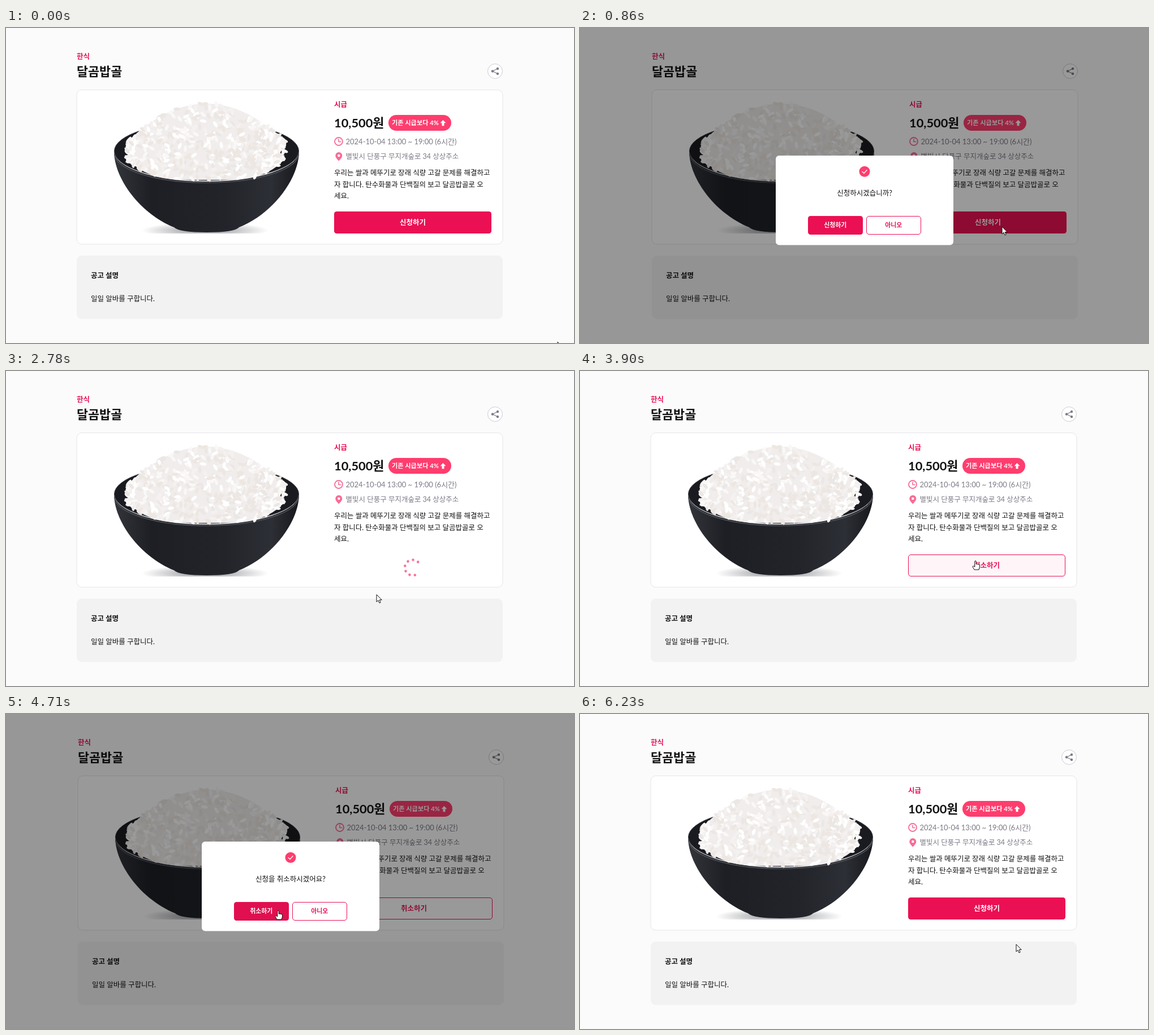
These frames come from a looping animation (1004x558 px, 6310 ms). An HTML page:

```html
<!DOCTYPE html>
<html lang="ko">
<head>
<meta charset="utf-8">
<style>
  html, body { margin: 0; width: 100%; height: 100%; overflow: hidden; background: #fbfbfb; }
  svg { display: block; }
  text { font: 12.5px Lato, "Noto Sans CJK KR", "Noto Sans CJK JP", sans-serif; fill: #111; }
  .bold { font-weight: 700; }
  .big { font-size: 21.8px; }
  .small { font-size: 10.9px; }
  .mid { text-anchor: middle; }
  .gray { fill: #7d7986; }
  .red { fill: #eb1053; }
  .white { fill: #fff; }
  .solid rect { fill: #eb1053; }
  .solid.hover rect { fill: #e00f4f; }
  .outline rect { fill: #fff; stroke: #eb1053; }
  .outline.hover rect { fill: #fff5f8; }
  .line { fill: none; stroke-width: 1.6; stroke-linecap: round; stroke-linejoin: round; }
</style>
</head>
<body>
<svg width="1004" height="558" viewBox="0 0 1004 558">
  <defs>
    <linearGradient id="bowlTone">
      <stop offset="0" stop-color="#33353b"/>
      <stop offset=".2" stop-color="#1d1f24"/>
      <stop offset=".6" stop-color="#22242a"/>
      <stop offset=".85" stop-color="#2d2f36"/>
      <stop offset="1" stop-color="#17181c"/>
    </linearGradient>
    <radialGradient id="shadow" cy=".8">
      <stop offset=".4" stop-color="#b9babd"/>
      <stop offset="1" stop-color="#fff"/>
    </radialGradient>
  </defs>

  <g id="page">
    <text class="bold red" x="125" y="54.6">한식</text>
    <text class="bold big" x="125" y="85">달곰밥골</text>
    <circle cx="864.5" cy="76.5" r="13" fill="#fff" stroke="#cbc9cf"/>
    <path class="line" d="M869 72l-9 4.5 9 4.5" stroke="#7d7986" style="stroke-width:1.3"/>
    <g fill="#7d7986">
      <circle cx="869" cy="72" r="2.2"/><circle cx="860" cy="76.5" r="2.2"/><circle cx="869" cy="81" r="2.2"/>
    </g>

    <rect x="125" y="109.5" width="753" height="273.5" rx="9" fill="#fff" stroke="#e5e6eb"/>
    <rect x="240" y="336" width="224" height="28" fill="url(#shadow)"/>
    <ellipse cx="354.5" cy="218" rx="163" ry="52" fill="#1a1b20" stroke="#3c3e45"/>
    <path d="M191 218A163.5 54 0 0 0 518 218C518 268 470 330 412 353Q404 362 355 362T297 353C239 330 191 268 191 218Z" fill="url(#bowlTone)"/>
    <path d="M192 223A162.5 51 0 0 0 517 223" fill="none" stroke="#50525a" stroke-width="1.5"/>
    <g id="rice"></g>

    <text class="bold red" x="580" y="139.6">시급</text>
    <text class="bold big" x="580" y="176">10,500원</text>
    <rect x="676" y="154" width="111" height="28" rx="14" fill="#ff3d6e"/>
    <text class="bold white" x="682" y="172" style="font-size:11.2px">기존 시급보다 4%</text>
    <path d="M772.5 163l5 5.2h-3v5h-4v-5h-3z" fill="#fff"/>
    <circle cx="588" cy="201" r="7" class="line" stroke="#f86c96" style="stroke-width:1.8"/>
    <path d="M588 197v4.5h4" class="line" stroke="#f86c96"/>
    <text class="gray" x="600.5" y="205.5" style="font-size:13px">2024-10-04 13:00 ~ 19:00 (6시간)</text>
    <path d="M588.3 235.5C584 231 582.3 228.5 582.3 226a6 6 0 0 1 12 0C594.3 228.5 592.6 231 588.3 235.5Z" fill="#f86c96"/>
    <circle cx="588.3" cy="226" r="2.2" fill="#fff"/>
    <text class="gray" x="600.5" y="232">별빛시 단풍구 무지개숲로 34 상상주소</text>
    <text x="580" y="261">우리는 쌀과 메뚜기로 장래 식량 고갈 문제를 해결하고</text>
    <text x="580" y="281.5">자 합니다. 탄수화물과 단백질의 보고 달곰밥골로 오</text>
    <text x="580" y="302">세요.</text>

    <g id="apply" class="solid">
      <rect x="580" y="325" width="278" height="39" rx="4.5"/>
      <text class="bold mid white" x="719" y="349">신청하기</text>
    </g>
    <g id="cancel" class="outline">
      <rect x="580.5" y="325.5" width="277" height="38" rx="4.5"/>
      <text class="bold mid red" x="719" y="349">취소하기</text>
    </g>
    <g id="spinner" fill="#fb7299"></g>

    <rect x="125" y="403" width="753" height="112.5" rx="9" fill="#f2f2f3"/>
    <text class="bold" x="150" y="442.7">공고 설명</text>
    <text x="150" y="483.5">일일 알바를 구합니다.</text>
  </g>

  <g id="modal">
    <rect width="1004" height="558" fill-opacity=".4"/>
    <rect x="346" y="226" width="314" height="158.5" rx="6" fill="#fff"/>
    <circle cx="503" cy="254.3" r="9.5" fill="#ff3d6e"/>
    <path class="line" d="M499 254.5l3 2.8 5-5.5" stroke="#fff" style="stroke-width:1.3"/>
    <text id="question" class="mid" x="503" y="296.5"></text>
    <g id="confirm" class="solid">
      <rect x="403" y="333" width="97" height="33" rx="4.5"/>
      <text id="answer" class="bold small mid white" x="451.3" y="353.3"></text>
    </g>
    <g class="outline">
      <rect x="506.5" y="333.5" width="96" height="32" rx="4.5"/>
      <text class="bold small mid red" x="554.3" y="353.3">아니오</text>
    </g>
  </g>

  <g id="cursor" fill="#fff" stroke="#111" stroke-linejoin="round">
    <path id="arrow" d="M0 0V13L3 10.2 5 15 7.2 14 5.2 9.5H9.2Z"/>
    <path id="hand" d="M-1.2 1Q0-.8 1.2 1V6Q5 5.6 7.5 7.5V11L6 16H-2L-5.2 10.5Q-4.5 8.5-1.2 11Z"/>
  </g>
</svg>

<script>
const LOOP = 6310, STEP = 80, SPIN_PERIOD = 640;
const $ = id => document.getElementById(id);
const show = (id, on) => $(id).style.display = on ? '' : 'none';
const held = ms => Math.floor(ms / STEP) * STEP;

// [start, view, spinner angle at start]
const VIEWS = [
  [0, 'apply'], [860, 'applyModal'], [1490, 'spinner', 13], [2940, 'cancel'],
  [4060, 'cancelModal'], [4790, 'spinner', 31], [5430, 'apply']
];

// Cursor stops: [time, x, y]
const STOPS = [
  [0, 975, 556], [460, 735, 346], [610, 735, 346], [860, 746, 352], [940, 746, 352],
  [1240, 470, 354], [1330, 470, 354], [1490, 661, 355], [1730, 661, 355], [2370, 655, 396],
  [3020, 655, 396], [3660, 696, 334], [3820, 696, 334], [3900, 699, 336], [3980, 699, 336],
  [4060, 700, 343], [4140, 700, 343], [4710, 481, 348], [4790, 481, 348], [5430, 616, 395],
  [5900, 616, 395], [6230, 771, 408], [LOOP, 771, 408]
];

function buildRice() {
  let seed = 7;
  const random = () => (seed = seed * 16807 % 2147483647) / 2147483647;
  const top = u => 134 + 66 * u * u;
  const bottom = u => 269 - 36 * u ** 4;
  const points = [];
  for (let u = -1; u <= 1; u += .05) {
    points.unshift([354 + u * 138, top(u)]);
    points.push([354 + u * 138, bottom(u)]);
  }
  let shapes = `<polygon points="${points.join(' ')}" fill="#f0edec"/>`;
  const tones = ['#fff', '#faf8f7', '#f4f1f0', '#ebe7e5', '#eee7e1'];
  for (let i = 0; i < 520; i++) {
    const u = random() * 2 - 1;
    const x = 354 + u * 140, y = top(u) + random() * (bottom(u) - top(u));
    shapes += `<ellipse rx="6" ry="2.8" fill="${tones[i % 5]}" transform="translate(${x} ${y}) rotate(${random() * 180})"/>`;
  }
  $('rice').innerHTML = shapes;
}

function buildSpinner() {
  for (let i = 0; i < 7; i++) {
    $('spinner').innerHTML += `<circle cx="13.8" r="2.3" transform="rotate(${60 + i * 40})"/>`;
  }
}

function cursorAt(t) {
  const i = STOPS.findIndex(stop => stop[0] > t);
  const [t0, x0, y0] = STOPS[i - 1], [t1, x1, y1] = STOPS[i];
  const p = held(t - t0) / (t1 - t0), e = p * p * (3 - 2 * p);
  return [x0 + (x1 - x0) * e, y0 + (y1 - y0) * e];
}

function draw(t) {
  const [start, view, angle] = VIEWS.findLast(v => v[0] <= t);
  const modal = view.endsWith('Modal');
  const base = view.replace('Modal', '');
  const [x, y] = cursorAt(t);
  const within = (left, top, right, bottom) => x >= left && x <= right && y >= top && y <= bottom;
  const overMain = !modal && base !== 'spinner' && within(580, 325, 858, 364);
  const overConfirm = modal && within(403, 333, 500, 366);
  const overButton = overMain || overConfirm;

  for (const id of ['apply', 'cancel', 'spinner']) show(id, id === base);
  show('modal', modal);
  show('hand', overButton);
  show('arrow', !overButton);
  $('apply').classList.toggle('hover', overMain);
  $('cancel').classList.toggle('hover', overMain);
  $('confirm').classList.toggle('hover', overConfirm);
  $('question').textContent = base === 'apply' ? '신청하시겠습니까?' : '신청을 취소하시겠어요?';
  $('answer').textContent = base === 'apply' ? '신청하기' : '취소하기';

  // Hiding the scrollbar nudges the page while the dialog is open
  $('page').setAttribute('transform', `translate(${modal ? 2 : 0})`);
  if (base === 'spinner') {
    const turn = angle + held(t - start) / SPIN_PERIOD * 360;
    $('spinner').setAttribute('transform', `translate(718.8 348.3) rotate(${turn})`);
  }
  $('cursor').setAttribute('transform', `translate(${x} ${y})`);
}

function tick() {
  draw(performance.now() % LOOP);
  requestAnimationFrame(tick);
}

buildRice();
buildSpinner();
tick();
</script>
</body>
</html>
```
